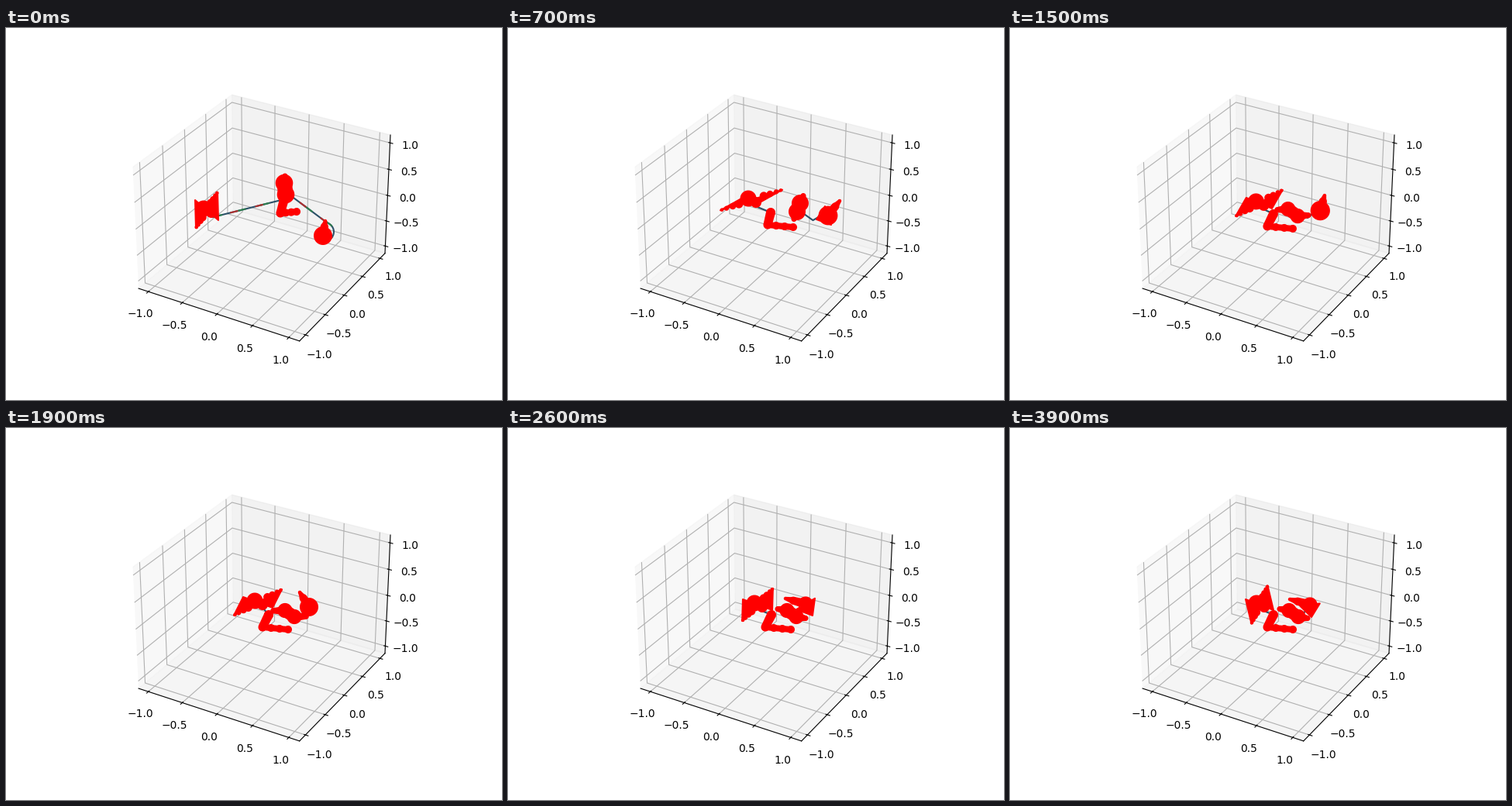
A matplotlib script for the animation above (4 s loop, 640 by 480 pixels).

```python
import numpy as np
import matplotlib.pyplot as plt
from matplotlib.animation import FuncAnimation
from matplotlib.collections import PolyCollection

# Points on the stage are complex numbers: x + y*1j, in pixels, y downwards.
STEP = 100
FRAMES = 40
RING = np.exp(1j * np.linspace(0, 2 * np.pi, 40, endpoint=False))


def path(keys):
    """Smooth function of time through {ms: value}; holds the last value."""
    times = np.array(list(keys), float)
    values = np.array(list(keys.values()))
    slopes = (np.gradient(values, times) if len(keys) > 2
              else np.zeros_like(values))
    slopes[-1] = 0

    def at(t):
        t = min(t, times[-1])
        i = min(np.searchsorted(times, t, side="right"), len(times) - 1) - 1
        span = times[i + 1] - times[i]
        u = (t - times[i]) / span
        a, b = values[i], values[i + 1]
        da, db = slopes[i] * span, slopes[i + 1] * span
        return (a + da * u + (3 * (b - a) - 2 * da - db) * u**2
                + (2 * (a - b) + da + db) * u**3)
    return at


def disc(p, r):
    return p + RING * (r - 1)      # the outline adds one pixel


def taper(p, q, r, s):
    """Strip from p to q with half-widths r and s and round ends."""
    n = 1j * (q - p) / max(abs(q - p), 1e-6)
    body = np.array([p + n * (r - 1), q + n * (s - 1),
                     q - n * (s - 1), p - n * (r - 1)])
    return [body, disc(p, r), disc(q, s)]


wing_hub = path({0: 259 + 235j, 700: 314 + 222j, 1200: 318 + 226j,
                 1900: 325 + 225j, 2600: 322 + 228j})
wing_reach = path({0: 14.0, 700: 40, 1200: 31, 1900: 31, 3300: 10.5})
wing_cross = path({0: 15 + 13j, 700: 4 + 7j, 1200: 13 + 7j, 3300: 18 + 7j})

torso_hub = path({0: 360 + 207.5j, 700: 375 + 231.5j, 1200: 366 + 236j,
                  1900: 366 + 239.5j})
torso_axis = path({0: 1 + 7.5j, 700: -2 + 5.5j, 1200: 5 + 5j, 1900: 6 + 4j})
torso_nub = path({0: 16.5j, 700: -6 + 15j, 1200: 14 + 6j, 2600: 18 + 6j})
torso_size = path({0: 11.3, 700: 11, 1200: 9.6})

heel_at = path({0: 354 + 239j, 700: 335 + 254j, 1200: 333 + 255j,
                1900: 331 + 257j, 2600: 332 + 257j})
leg = path({0: 5 - 18j, 700: 4 - 16j, 1200: 8 - 16j})
sole = path({0: 21 - 2j, 700: 33 + 3j})

head_hub = path({0: 409 + 268j, 700: 413 + 242j, 1200: 407 + 239j,
                 1900: 391 + 231j, 2600: 384 + 227j, 3300: 387 + 228j})
head_spike = path({0: 3 - 19j, 700: 15 - 19j, 1200: 16 - 19j,
                   1900: -12 - 19j, 2600: -26 - 7j})
head_fin = path({0: -2 + 10j, 700: -15 + 5j, 1200: -16 + 5j,
                 1900: 7 + 8j, 2600: 9 + 15j, 3300: 2 + 16j})
head_size = path({0: 12.0, 1900: 12, 2600: 9.6})

wire_sag = path({0: 26 + 9j, 700: 10j, 1200: 8j, 1900: 6j})
wire_hook = path({0: 12.0, 700: 3})


def wing(t):
    """Bow tie of two crossing bars, beaded along the long one."""
    hub, x = wing_hub(t), wing_reach(t)
    arm, cross = x - (28.5 - 0.38 * x) * 1j, wing_cross(t)
    shapes = [disc(hub - 4 - 2j, 10.5), disc(hub + 6 + 3j, 7)]
    for side in (-1, 1):
        shapes.append(np.array([hub, hub + side * arm, hub + side * cross]))
        shapes += [disc(hub + side * arm * k, 7.5 - 5.5 * k)
                   for k in (0.4, 0.6, 0.8, 0.95)]
    return shapes


def torso(t):
    hub, axis, nub, r = torso_hub(t), torso_axis(t), torso_nub(t), torso_size(t)
    shapes = taper(hub - axis, hub + axis, r - 1.5, r - 1.5)
    for side in (-1, 1):
        shapes.append(disc(hub + side * axis, r))
        shapes += taper(hub + side * axis, hub + side * nub, 6, 3.5)
    return shapes


def foot(t):
    heel, toe = heel_at(t), heel_at(t) + sole(t)
    beads = [disc(heel + (toe - heel) * k / 3, 5) for k in range(4)]
    return taper(heel, heel + leg(t), 5.5, 6) + taper(heel, toe, 4, 4) + beads


def head(t):
    hub, spike, fin = head_hub(t), head_spike(t), head_fin(t)
    base = 0.8j * fin
    joint = hub + 0.62 * spike
    return ([disc(hub, head_size(t)),
             np.array([hub - base, hub + base, hub + fin])]
            + taper(hub, joint, 6, 5) + taper(joint, hub + spike, 4.5, 2.2))


def wires(t):
    """Straight wire wing to leg, and a sagging one that hooks round the head."""
    start, end = torso_hub(t) + torso_axis(t) / 2, head_hub(t)
    bend = (start + end) / 2 + wire_sag(t)
    hook = end + 2 - 5j + wire_hook(t) * np.exp(1j * np.linspace(-1, 1.4, 12))
    return [np.array([wing_hub(t) + 8 + 9j, heel_at(t) + leg(t)]),
            np.array([start, bend, *hook])]


fig = plt.figure(figsize=(6.4, 4.8), dpi=100)
box = fig.add_subplot(projection="3d")
limit = 1.1 * 25 / 24
ticks = np.arange(-1, 1.1, 0.5)
for axis in "xyz":
    box.set(**{axis + "lim": (-limit, limit), axis + "ticks": ticks})

stage = fig.add_axes([0, 0, 1, 1])
stage.axis("off")

STYLES = [("#2b5068", "-"), ("#2f7d4f", (0, (6, 9))), ("#b03030", (5, (5, 11)))]
strands = [[stage.plot([], [], color=c, ls=ls, lw=1.5, zorder=1)[0]
            for c, ls in STYLES] for _ in range(2)]
body = PolyCollection([], facecolor="red", edgecolor="red", linewidth=1.44,
                      joinstyle="round", zorder=2)
stage.add_collection(body, autolim=False)
stage.set(xlim=(0, 640), ylim=(480, 0))


def draw(n):
    t = n * STEP
    shapes = wing(t) + torso(t) + foot(t) + head(t)
    body.set_verts([np.column_stack([s.real, s.imag]) for s in shapes])
    for pts, lines in zip(wires(t), strands):
        for k, line in enumerate(lines):
            line.set_data(pts.real, pts.imag)
            line.set_alpha(max(0, 1 - t / 700) if k else 1)
    return [body]


anim = FuncAnimation(fig, draw, frames=FRAMES, interval=STEP, repeat=True,
                     repeat_delay=0, blit=False)
plt.show()
```
